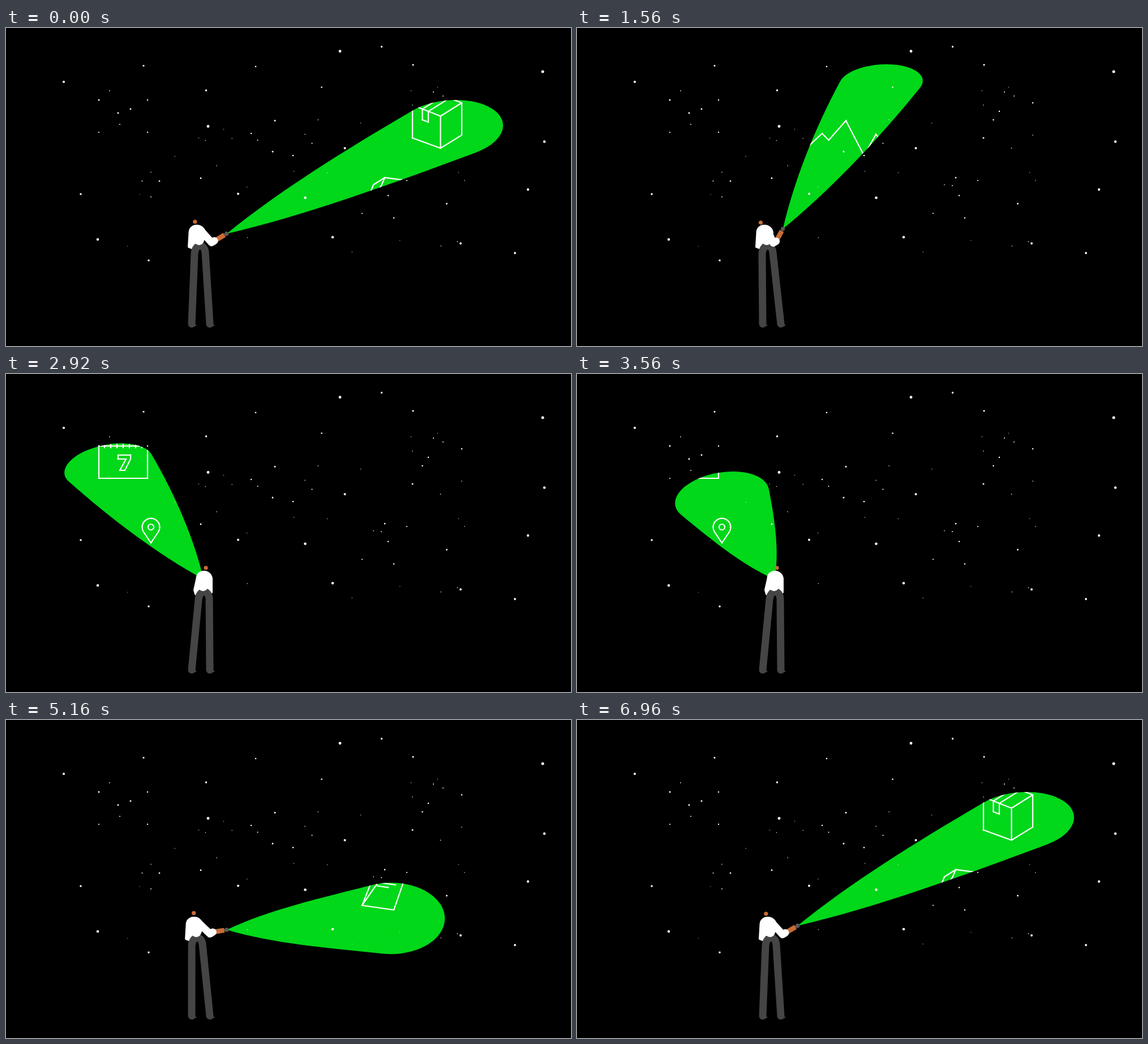
An HTML page with a canvas that plays this animation: 998x561 px, repeating every 7000 ms.

```html
<!DOCTYPE html>
<html lang="en">
<head>
<meta charset="utf-8">
<title>Torch under the stars</title>
<style>
  html, body { margin: 0; width: 100%; height: 100%; overflow: hidden; background: #000; }
  canvas { display: block; width: 100vw; height: 100vh; }
</style>
</head>
<body>
<canvas id="stage" width="998" height="561"></canvas>
<script>
const LOOP = 7000, REST = 6960;
const GREEN = '#00d819', SKIN = '#c96b35', PANTS = '#454545', TORCH = '#585858', WHITE = '#fff';
const ctx = document.getElementById('stage').getContext('2d');

// where the light points: x, y, half width, half height, skew
const SWEEP = [
  { t: 0, spot: [783, 178.5, 95, 51.5, 618] },
  { t: 720, spot: [617, 112, 84, 40, 450] },
  { t: 1560, spot: [537, 97.5, 74, 33.5, 325] },
  { t: 2360, spot: [277, 122.4, 73, 35.4, 920] },
  { t: 3000, spot: [179, 169, 79, 41, 890] },
  { t: 3560, spot: [256, 217.5, 83, 45.5, 860] },
  { t: 4320, spot: [428, 254, 88, 52, 300] },
  { t: 5160, spot: [680, 350, 95, 63, 0] },
  { t: 6120, spot: [783, 255, 96, 54, 200] }
];
SWEEP.push({ t: REST, spot: SWEEP[0].spot });

// every absolute M or L point of an icon is also a star
const ICONS = [
  // parcel
  'M718 136 L718 194 L767.5 212 L805 189 L805 132 L755 113 Z l49.5 19.5 v56.5 m0 -56.5 l37.5 -23.5',
  'M772 120 l-36.5 23 L735.5 162 l10.5 4 L746 147 l37 -23',
  // page
  'M629 327 L685 335 L708 269 L669 264 L649 276.5 Z L663 278 L669 264 m-12 22.5 l32 4.5 m-34 1.5 L675 295.5',
  // mountains
  'M372 243 L433 186 L444.5 198 L475 163.5 L507 225 L528 187.5 L540.5 203.5',
  // calendar
  'M164 127 L250 127 L250 184 L164 184 Z m-1 -4' + ' m11 0 v8 m0 -8'.repeat(7),
  'M198 150 v-7 h22 L220 143 v7 l-10 20 L201 170 l11 -20 Z',
  // map pin
  'M240.5 270 M271 270 M256 298 l-13.4 -20 a15.5 15.5 0 1 1 26.8 0 Z',
  'M256 254.5 m5 15.5 a5 5 0 1 1 -10 0 a5 5 0 1 1 10 0'
].join(' ');
const iconPath = new Path2D(ICONS);

// from the brightest to the dimmest
const BRIGHT = [
  [948, 77], [590, 41], [357, 173.5], [528.5, 299.5], [577, 369], [162, 373], [951, 200.5], [922, 285],
  [102, 95], [598.5, 212], [410, 292.5], [803, 380], [899, 397], [132, 293], [252, 410],
  [353.5, 110], [663.5, 33], [719, 65], [243, 66.5], [471, 218], [778.5, 310], [344, 265], [557.5, 104.5], [441, 68]
];

let seed = 7;
const random = () => (seed = seed * 16807 % 2147483647) / 2147483647;

const stars = BRIGHT.map(([x, y], i) => ({ x, y, r: 2.5 - i * 0.052 }));
for (const [, x, y] of ICONS.matchAll(/[ML]([\d.]+) ([\d.]+)/g)) {
  stars.push({ x: +x, y: +y, r: 0.8 + 0.8 * random() ** 2 });
}
for (let i = 0; i < 22; i++) {
  stars.push({ x: 60 + 800 * random(), y: 85 + 330 * random(), r: 0.5 + 0.35 * random() });
}

const mix = (a, b, u) => a + (b - a) * u;
function smooth(from, to, v) {
  const u = Math.min(1, Math.max(0, (v - from) / (to - from)));
  return u * u * (3 - 2 * u);
}

// smooth curve through the key spots that never overshoots and rests at both ends
function spotAt(t) {
  let i = SWEEP.length - 2;
  while (SWEEP[i].t > t) i--;
  const rise = (j, c) => SWEEP[j] && SWEEP[j + 1]
    ? (SWEEP[j + 1].spot[c] - SWEEP[j].spot[c]) / (SWEEP[j + 1].t - SWEEP[j].t) : 0;
  const slope = (j, c) => {
    const a = rise(j - 1, c), b = rise(j, c);
    return a * b > 0 ? 2 * a * b / (a + b) : 0;
  };
  const { t: t0, spot } = SWEEP[i], next = SWEEP[i + 1];
  const span = next.t - t0, u = (t - t0) / span, v = 1 - u;
  return spot.map((p, c) => mix(p, next.spot[c], u * u * (3 - 2 * u))
    + span * u * v * (v * slope(i, c) - u * slope(i + 1, c)));
}

// the whole body follows the direction of the light
function poseFor([x, y]) {
  const angle = Math.atan2(y - 365, x - 345);
  const cos = Math.cos(angle), sin = Math.sin(angle);
  const turn = smooth(0.4, -0.4, cos);
  const lean = 6 * Math.max(0, Math.sin(4 * Math.min(-angle, Math.PI / 4)));
  const hip = mix(327 + lean, 340, turn);
  const tip = { x: 346 + 44 * smooth(0.3, 0.95, cos) + 3 * turn, y: mix(371 + 20.5 * sin, 362, turn) };
  const hold = angle - 0.12;
  return {
    hip, turn, tip,
    hand: {
      x: mix(tip.x - 25 * Math.cos(hold), hip + 7, turn),
      y: mix(tip.y - 25 * Math.sin(hold), 371, turn)
    },
    head: { x: hip + mix(4 + 8 * sin, 13, turn), y: mix(340.5 - 3.5 * sin, 342, turn) }
  };
}

function dot(x, y, r, color) {
  ctx.fillStyle = color;
  ctx.beginPath();
  ctx.arc(x, y, r, 0, Math.PI * 2);
  ctx.fill();
}

function line(d, width, color, cap = 'butt') {
  ctx.strokeStyle = color;
  ctx.lineWidth = width;
  ctx.lineCap = cap;
  ctx.lineJoin = cap === 'round' ? 'round' : 'miter';
  ctx.stroke(d instanceof Path2D ? d : new Path2D(d));
}

// slanted ellipse joined to the torch by two bowed edges
function traceBeam([cx, cy, w, h, k], tip) {
  const skew = -k / w, q = Math.sqrt(h * h - skew * skew);
  const px = (tip.x - cx) / w, py = (tip.y - cy - skew * px) / q;
  const middle = Math.atan2(py, px);
  const half = Math.acos(1 / Math.hypot(px, py)) + 0.07;
  const edge = side => {
    const a = middle + side * half, u = Math.cos(a), v = Math.sin(a);
    const x = cx + w * u, y = cy + skew * u + q * v;
    const ex = x - tip.x, ey = y - tip.y, length = Math.hypot(ex, ey);
    const dx = w * v * side, dy = (skew * v - q * u) * side;
    const pull = 0.35 * length / Math.hypot(dx, dy), bow = 12 * side / length;
    return {
      near: [tip.x + ex * 0.3 + ey * bow, tip.y + ey * 0.3 - ex * bow],
      far: [x + dx * pull, y + dy * pull],
      end: [x, y], a
    };
  };
  const out = edge(1), back = edge(-1);
  ctx.beginPath();
  ctx.moveTo(tip.x, tip.y);
  ctx.bezierCurveTo(...out.near, ...out.far, ...out.end);
  ctx.save();
  ctx.transform(w, skew, 0, q, cx, cy);
  ctx.arc(0, 0, 1, out.a, back.a + Math.PI * 2);
  ctx.restore();
  ctx.bezierCurveTo(...back.far, ...back.near, tip.x, tip.y);
  ctx.closePath();
}

function drawBeam(spot, tip) {
  ctx.save();
  traceBeam(spot, tip);
  ctx.fillStyle = GREEN;
  ctx.fill();
  ctx.clip();
  line(iconPath, 2.2, WHITE);
  ctx.restore();
}

function drawFigure({ hip, turn, tip, hand, head }) {
  // torch and forearm
  const gripX = mix(hand.x, tip.x, 0.82), gripY = mix(hand.y, tip.y, 0.82);
  line(`M${gripX} ${gripY} L${tip.x} ${tip.y}`, 5, TORCH);
  dot(tip.x, tip.y, 3.7, TORCH);
  line(`M${hand.x} ${hand.y} L${gripX} ${gripY}`, 8.5, SKIN);

  dot(head.x, head.y, 3.6, SKIN);

  // shirt
  const left = hip - 8.5 + 6 * turn, right = hip + 18 + 5 * turn;
  const shirt = new Path2D(`M${hip - 10 + 3 * turn} ${386 - 5 * turn} L${left} 361
    C${left} 345 ${right - 2} 345 ${right} 361 L${hip + 16 + 7 * turn} ${373 + 12 * turn}
    L${hip} 384 L${hip - 5} 388 Z`);
  ctx.fillStyle = WHITE;
  ctx.fill(shirt);
  line(shirt, 4, WHITE, 'round');

  // trousers and shoes
  line(`M328 522 L${hip} 398 C${hip + 1} 380 ${hip + 18} 380 ${hip + 19} 396 L360 522`, 13, PANTS, 'round');
  ctx.fillStyle = PANTS;
  for (const x of [329, 361]) ctx.fill(new Path2D(`M${x} 528.5 l8 -4 l-4 -2.5 Z`));

  // shirt tail and sleeve
  dot(hip + 8, 374, 9, WHITE);
  line(`M${right - 9} 355 L${hand.x - 5} ${hand.y + 3} L${hand.x} ${hand.y}`, 13, WHITE, 'round');
}

function draw(now) {
  const spot = spotAt(Math.min(now % LOOP, REST));
  const pose = poseFor(spot);
  ctx.fillStyle = '#000';
  ctx.fillRect(0, 0, 998, 561);
  drawBeam(spot, pose.tip);
  for (const { x, y, r } of stars) dot(x, y, r, WHITE);
  drawFigure(pose);
}

const start = performance.now();
function tick() {
  draw(performance.now() - start);
  requestAnimationFrame(tick);
}
tick();
</script>
</body>
</html>
```
